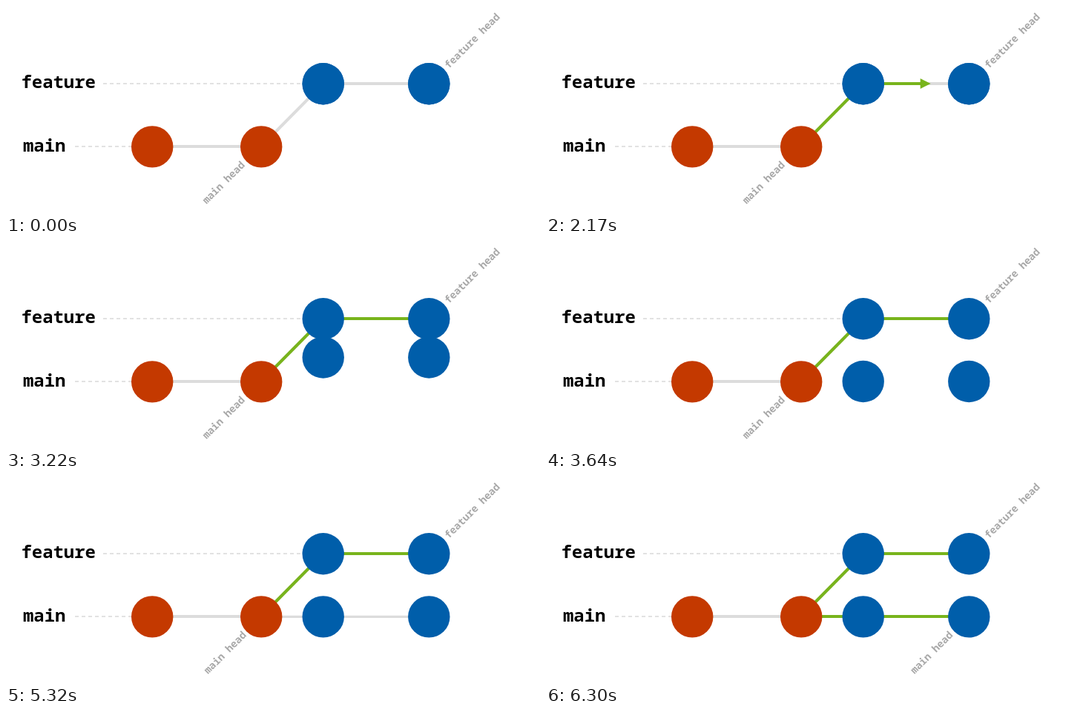
An HTML page that plays this animation: 720x280 px, repeating every 6.86 s.

```html
<!DOCTYPE html>
<html lang="en">
<head>
<meta charset="utf-8">
<title>Fast-forward merge</title>
<style>
  html, body { margin: 0; height: 100%; overflow: hidden; background: #fff; }
  svg { display: block; width: 720px; height: 280px; }
  text { font-family: "Noto Sans Mono", "DejaVu Sans Mono", monospace; font-weight: 700; }
  .branch { font-size: 23.9px; }
  .head { font-size: 13.7px; fill: #a8a8a8; }
  .edge { stroke: #dcdcdc; stroke-width: 4; }
  .dashed { stroke: #d9d9d9; stroke-width: 1.6; stroke-dasharray: 5 4; }
  .arrow { stroke: #78b41c; stroke-width: 4; }
  .arrow path { fill: #78b41c; stroke: none; }
  .main { fill: #c43900; }
  .feature { fill: #005eaa; }
</style>
</head>
<body>
<svg viewBox="0 0 720 280">
  <path class="dashed" d="M131 105H400M93 190H169"/>
  <path class="edge" fill="none" d="M197 190H344L427.7 105H570"/>
  <line id="newEdge" class="edge" style="stroke-width:3.4" x1="344" y1="190.4" x2="344" y2="190.4"/>
  <g id="arrows"></g>
  <g id="copies" class="feature">
    <circle cx="427.7" cy="105.2" r="28.2"/>
    <circle cx="570.3" cy="105.2" r="28.2"/>
  </g>
  <g class="feature">
    <circle cx="427.7" cy="105.2" r="28.2"/>
    <circle cx="570.3" cy="105.2" r="28.2"/>
  </g>
  <g class="main">
    <circle cx="197.2" cy="190.4" r="28.2"/>
    <circle cx="344.2" cy="190.4" r="28.2"/>
  </g>
  <text class="branch" x="20.5" y="111">feature</text>
  <text class="branch" x="23" y="196.5">main</text>
  <text class="head" transform="translate(597 85.3) rotate(-45)">feature head</text>
  <g id="mainHead">
    <text class="head" transform="translate(270.5 268.3) rotate(-45)">main head</text>
  </g>
</svg>
<script>
const LOOP = 6860, STEP = 70;
const SVG_NS = "http://www.w3.org/2000/svg";
const byId = id => document.getElementById(id);

const progress = (t, start, duration) => Math.min(1, Math.max(0, (t - start) / duration));
const easeInOut = p => p < 0.5 ? 2 * p * p : 1 - 2 * (1 - p) ** 2;
const eased = (t, start, duration) => easeInOut(progress(t, start, duration));

// An arrow travels between two commit centres, trailing a green line.
function makeArrow(x1, y1, x2, y2, start, duration) {
  const length = Math.hypot(x2 - x1, y2 - y1);
  const angle = Math.atan2(y2 - y1, x2 - x1) * 180 / Math.PI;
  const group = document.createElementNS(SVG_NS, "g");
  group.setAttribute("class", "arrow");
  group.setAttribute("transform", `translate(${x1} ${y1}) rotate(${angle})`);
  group.innerHTML = '<line/><path d="M5.5 0L-8.5 -7V7Z"/>';
  byId("arrows").append(group);
  const [line, tip] = group.children;
  return t => {
    const distance = length * eased(t, start, duration);
    line.setAttribute("x2", Math.max(0, distance - 6));
    tip.setAttribute("transform", `translate(${distance} 0)`);
  };
}

const MERGE = [5250, 1050];
const arrows = [
  makeArrow(344, 190, 427.7, 105, 500, 1060),
  makeArrow(428, 105, 570, 105, 1540, 1140),
  makeArrow(344, 190, 570, 190, ...MERGE)
];

function draw(time) {
  const t = Math.floor(time % LOOP / STEP) * STEP;
  arrows.forEach(update => update(t));
  byId("copies").setAttribute("transform", `translate(0 ${85.2 * eased(t, 2620, 1070)})`);
  byId("newEdge").setAttribute("x2", 344 + 226 * progress(t, 3690, 420));
  byId("mainHead").setAttribute("transform", `translate(${226.5 * eased(t, ...MERGE)} 0)`);
}

const origin = performance.now();
function frame() {
  draw(performance.now() - origin);
  requestAnimationFrame(frame);
}
frame();
</script>
</body>
</html>
```
